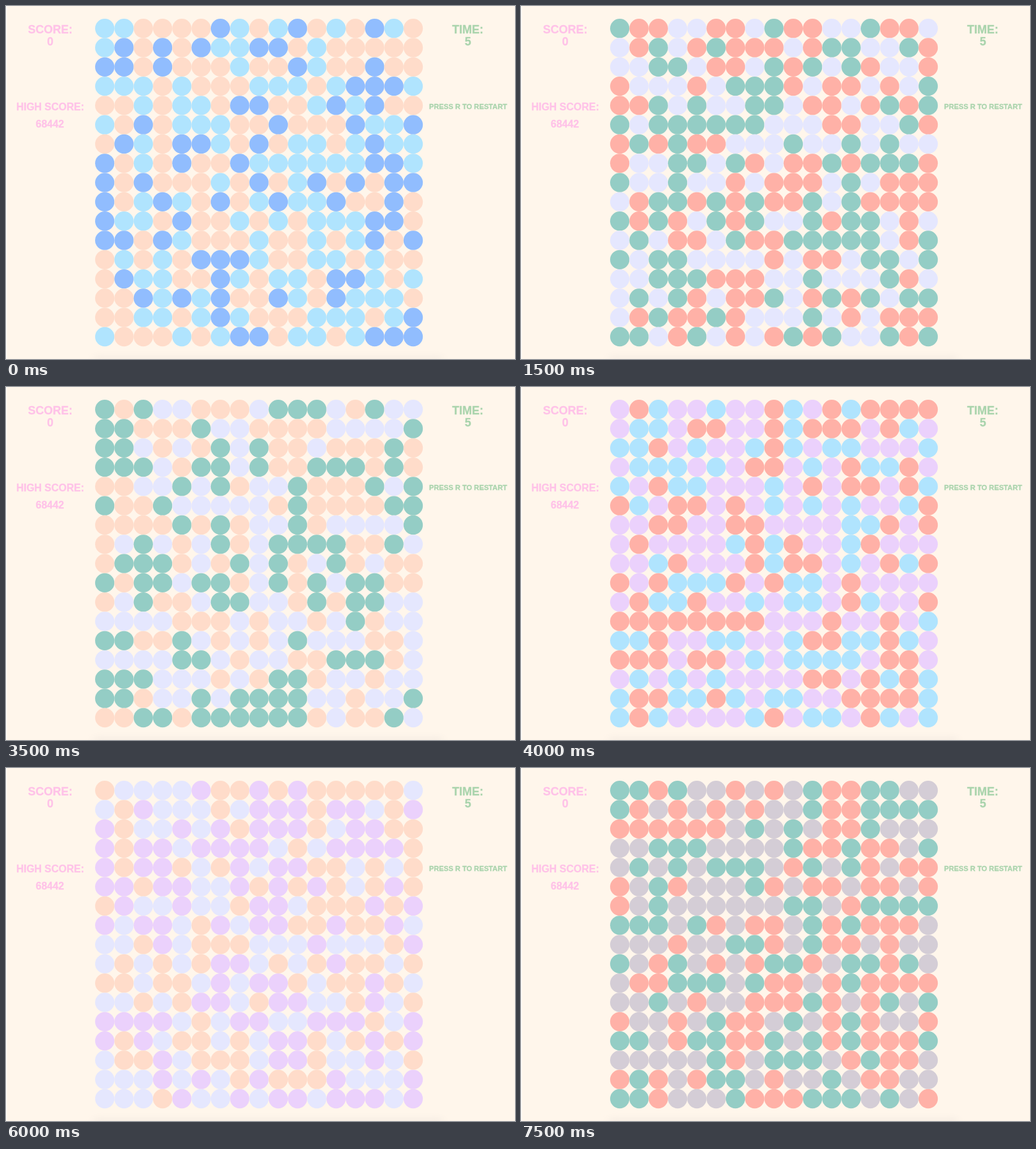
Recreate the animation shown at these times as an HTML page. Size 800 px wide and 555 px high, loop 8000 ms.

```html
<!DOCTYPE html>
<html lang="en">
<head>
<meta charset="utf-8">
<title>Dot board</title>
<style>
  html, body { margin: 0; width: 100%; height: 100%; overflow: hidden; background: #fff6eb; }
  svg { display: block; width: 800px; height: 555px; }
  text { font: bold 18px "Liberation Sans", Arial, sans-serif; text-anchor: middle; stroke-width: .3px; }
  .pink { fill: #ffc2e8; stroke: #ffc2e8; }
  .mint { fill: #aad4ad; stroke: #aad4ad; }
  .mid { font-size: 16px; }
  .small { font-size: 11.2px; }
</style>
</head>
<body>
<svg viewBox="0 0 800 555">
  <defs>
    <filter id="soft" x="-10%" y="-200%" width="120%" height="500%">
      <feGaussianBlur stdDeviation="7 4"/>
    </filter>
  </defs>
  <rect width="800" height="555" fill="#fff6eb"/>
  <rect width="1.5" height="555" fill="#fffdfa"/>
  <rect x="138" y="549" width="548" height="12" fill="#f8efe5" filter="url(#soft)"/>
  <g id="board"></g>
  <g class="pink">
    <text x="69.5" y="43.2">SCORE:</text>
    <text x="69.5" y="62.2">0</text>
    <text class="mid" x="69.5" y="163.8">HIGH SCORE:</text>
    <text class="mid" x="69" y="190.5">68442</text>
  </g>
  <g class="mint">
    <text x="725.8" y="43.2">TIME:</text>
    <text x="726" y="62.2">5</text>
    <text class="small" x="726.3" y="161.7">PRESS R TO RESTART</text>
  </g>
</svg>
<script>
const SIZE = 17, PITCH = 30.3, LEFT = 155.2, TOP = 35.2, RADIUS = 15.15;
const STEP = 500;

const C = {
  peach: '#ffdcca', sky: '#b0e4fe', blue: '#91bdfe', teal: '#94cdc5', yellow: '#ffe9ae',
  green: '#c0e8b5', coral: '#ffb1a7', lilac: '#ebd1fc', lavender: '#e5e7fe', grey: '#d4cdd6'
};

// Three colours per board, then the shares of the first two.
const boards = [
  ['peach', 'sky', 'blue', .40, .34],
  ['lilac', 'green', 'yellow', .34, .33],
  ['sky', 'teal', 'yellow', .34, .33],
  ['coral', 'lavender', 'teal', .33, .34],
  ['grey', 'blue', 'peach', .34, .33],
  ['green', 'coral', 'blue', .41, .29],
  ['yellow', 'lilac', 'sky', .33, .34],
  ['teal', 'peach', 'lavender', .34, .33],
  ['lilac', 'coral', 'sky', .39, .31],
  ['yellow', 'blue', 'coral', .33, .34],
  ['teal', 'green', 'blue', .47, .27],
  ['grey', 'sky', 'green', .34, .33],
  ['lilac', 'peach', 'lavender', .36, .32],
  ['blue', 'yellow', 'lilac', .33, .34],
  ['green', 'peach', 'teal', .34, .33],
  ['grey', 'coral', 'teal', .35, .34]
];

function seeded(seed) {
  return () => {
    seed = seed + 0x6d2b79f5 | 0;
    let t = Math.imul(seed ^ seed >>> 15, 1 | seed);
    t = t + Math.imul(t ^ t >>> 7, 61 | t) ^ t;
    return ((t ^ t >>> 14) >>> 0) / 4294967296;
  };
}

const group = document.getElementById('board');
const dots = Array.from({ length: SIZE * SIZE }, (_, i) => {
  const dot = document.createElementNS(group.namespaceURI, 'circle');
  dot.setAttribute('cx', LEFT + i % SIZE * PITCH);
  dot.setAttribute('cy', TOP + Math.floor(i / SIZE) * PITCH);
  dot.setAttribute('r', RADIUS);
  return group.appendChild(dot);
});

// Shuffle the dots, then colour them by share so the mix is exact.
function deal(index) {
  const [a, b, c, shareA, shareB] = boards[index];
  const random = seeded(index * 97 + 11);
  const order = [...dots];
  for (let i = order.length - 1; i > 0; i--) {
    const j = Math.floor(random() * (i + 1));
    [order[i], order[j]] = [order[j], order[i]];
  }
  order.forEach((dot, i) => {
    const part = i / order.length;
    dot.setAttribute('fill', C[part < shareA ? a : part < shareA + shareB ? b : c]);
  });
}

let shown = -1;
const start = performance.now();
function draw(now) {
  const index = Math.floor(Math.max(0, now - start) / STEP) % boards.length;
  if (index !== shown) deal(shown = index);
  requestAnimationFrame(draw);
}
draw(start);
</script>
</body>
</html>
```
